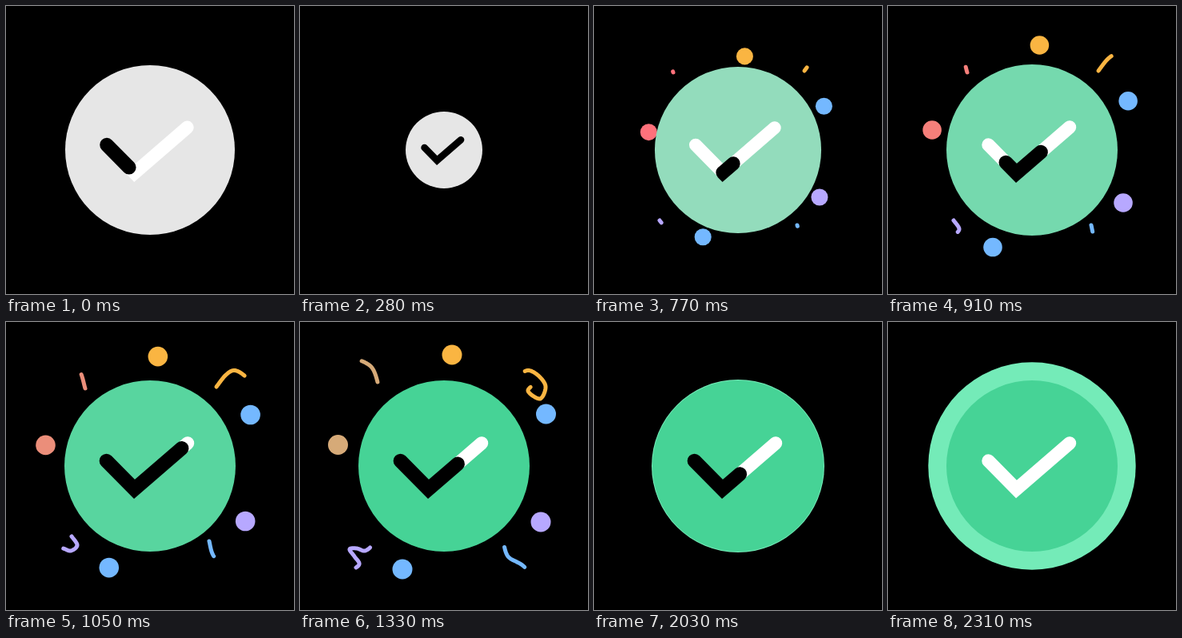
Recreate the animation shown at these times as an HTML page with a canvas. Size 360 by 360 pixels, loop 2380 ms.

```html
<!DOCTYPE html>
<html lang="en">
<head>
<meta charset="utf-8">
<title>Success check</title>
<style>
html, body { margin: 0; width: 100%; height: 100%; overflow: hidden; background: #000; }
canvas { display: block; }
</style>
</head>
<body>
<canvas id="stage" width="360" height="360"></canvas>
<script>
const ctx = document.getElementById('stage').getContext('2d');
const LOOP = 2380, STEP = 70, MID = 180, RADIUS = 107, TICK = 139;
const WHITE = [255, 255, 255], GREY = [230, 230, 230];
const GREEN = [70, 211, 150], MINT = [116, 235, 184];
const ORANGE = [250, 181, 66], BLUE = [116, 184, 255], PURPLE = [183, 168, 255];
const RED = [255, 113, 123], TAN = [214, 170, 120];

const clamp = v => Math.max(0, Math.min(1, v));
const span = (t, a, b) => clamp((t - a) / (b - a));
const smooth = u => u * u * (3 - 2 * u);
const lerp = (a, b, u) => a + (b - a) * u;
const mix = (a, b, u) => a.map((v, i) => lerp(v, b[i], u));
const css = c => `rgb(${c.map(Math.round).join()})`;

// Offsets from the centre; RED items drift towards TAN
const dots = [
  [10, -139, ORANGE], [127.5, -65, BLUE], [121, 70, PURPLE], [-52, 129, BLUE], [-132.5, -26.5, RED]
];

// Key points of each curve, and when its tail catches up with its head
const ribbons = [
  { color: ORANGE, end: 1720,
    pts: [[263, 81], [275, 66], [286, 60.5], [299, 68], [307, 81], [300, 96], [285, 86], [297, 77], [312, 80], [332, 92]] },
  { color: PURPLE, end: 1780,
    pts: [[82, 268], [89, 279], [81, 286], [71, 283], [62, 284], [68, 293], [74, 303], [62, 311], [50, 313], [46, 305]] },
  { color: BLUE, end: 1780, pts: [[254, 274], [260, 293], [278, 304], [296, 321]] },
  { color: RED, end: 1720, pts: [[99, 83], [89, 56], [62, 43]] }
];

function disc(x, y, r, color) {
  ctx.fillStyle = css(color);
  ctx.beginPath();
  ctx.arc(x, y, r, 0, Math.PI * 2);
  ctx.fill();
}

// Catmull-Rom point at u in 0..1
function along(pts, u) {
  const n = pts.length - 1;
  const i = Math.min(Math.floor(u * n), n - 1), f = u * n - i;
  const at = k => pts[Math.max(0, Math.min(n, k))];
  const [a, b, c, d] = [at(i - 1), at(i), at(i + 1), at(i + 2)];
  return [0, 1].map(k => b[k] + f / 2 * (c[k] - a[k] +
    f * (2 * a[k] - 5 * b[k] + 4 * c[k] - d[k] + f * (3 * (b[k] - c[k]) + d[k] - a[k]))));
}

function drawRibbon({ pts, color, end }, t, tint) {
  const head = smooth(span(t, 650, 1700)), tail = span(t, 1050, end) ** 2;
  if (head <= tail) return;
  ctx.strokeStyle = css(tint(color));
  ctx.lineWidth = 5;
  ctx.lineCap = ctx.lineJoin = 'round';
  ctx.beginPath();
  for (let k = 0; k <= 60; k++) ctx.lineTo(...along(pts, lerp(tail, head, k / 60)));
  ctx.stroke();
}

function drawConfetti(t) {
  const fade = span(t, 1600, 2100);
  if (t < 420 || fade > .95) return;
  const tint = c => mix(c === RED ? mix(RED, TAN, span(t, 770, 1330)) : c, WHITE, fade);
  const grow = 1 - (1 - span(t, 400, 1400)) ** 4;
  const scale = grow * (1 - span(t, 1600, 2300) ** 2);
  for (const [x, y, color] of dots) disc(MID + x * scale, MID + y * scale, 12.5 * scale, tint(color));
  for (const r of ribbons) drawRibbon(r, t, tint);
}

// Dark stretch of the tick, in pixels along it: fills, reopens from the elbow, then recedes
function darkSpan(t) {
  if (t < 560) return [0, lerp(40, TICK, span(t, 0, 210))];
  if (t < 1050) {
    const open = span(t, 630, 1050) ** 2;
    return [lerp(56, 0, open), lerp(60, 128, open)];
  }
  return [0, t < 2240 ? 76 + 52 * Math.exp((1050 - t) / 330) : 0];
}

function drawTick(t, scale) {
  ctx.save();
  ctx.translate(MID, MID);
  ctx.scale(scale, scale);
  ctx.translate(-MID, -MID);
  ctx.lineCap = 'round';
  ctx.lineJoin = 'miter';
  ctx.beginPath();
  ctx.moveTo(125.5, 173.5);
  ctx.lineTo(160.5, 209);
  ctx.lineTo(227, 151.5);
  ctx.lineWidth = 16.5;
  ctx.strokeStyle = '#fff';
  ctx.stroke();
  const [from, to] = darkSpan(t);
  if (to > from) {
    ctx.setLineDash([to - from, 400]);
    ctx.lineDashOffset = -from;
    ctx.lineWidth = 16.5 + 1.2 / scale;
    ctx.strokeStyle = '#000';
    ctx.stroke();
  }
  ctx.restore();
}

function draw(t) {
  ctx.fillStyle = '#000';
  ctx.fillRect(0, 0, 360, 360);
  drawConfetti(t);
  const radius = t < 400
    ? lerp(106, 32, smooth(t / 400))
    : lerp(32, RADIUS, smooth(span(t, 400, 820)));
  const ring = smooth(span(t, 1990, 2310));
  if (ring > 0) disc(MID, MID, lerp(RADIUS, 129.7, ring), MINT);
  disc(MID, MID, radius, mix(GREY, GREEN, span(t, 377, 1133)));
  drawTick(t, radius / RADIUS);
}

const start = performance.now();
function tick() {
  const t = (performance.now() - start) % LOOP;
  draw(Math.floor(t / STEP) * STEP);
  requestAnimationFrame(tick);
}
tick();
</script>
</body>
</html>
```
